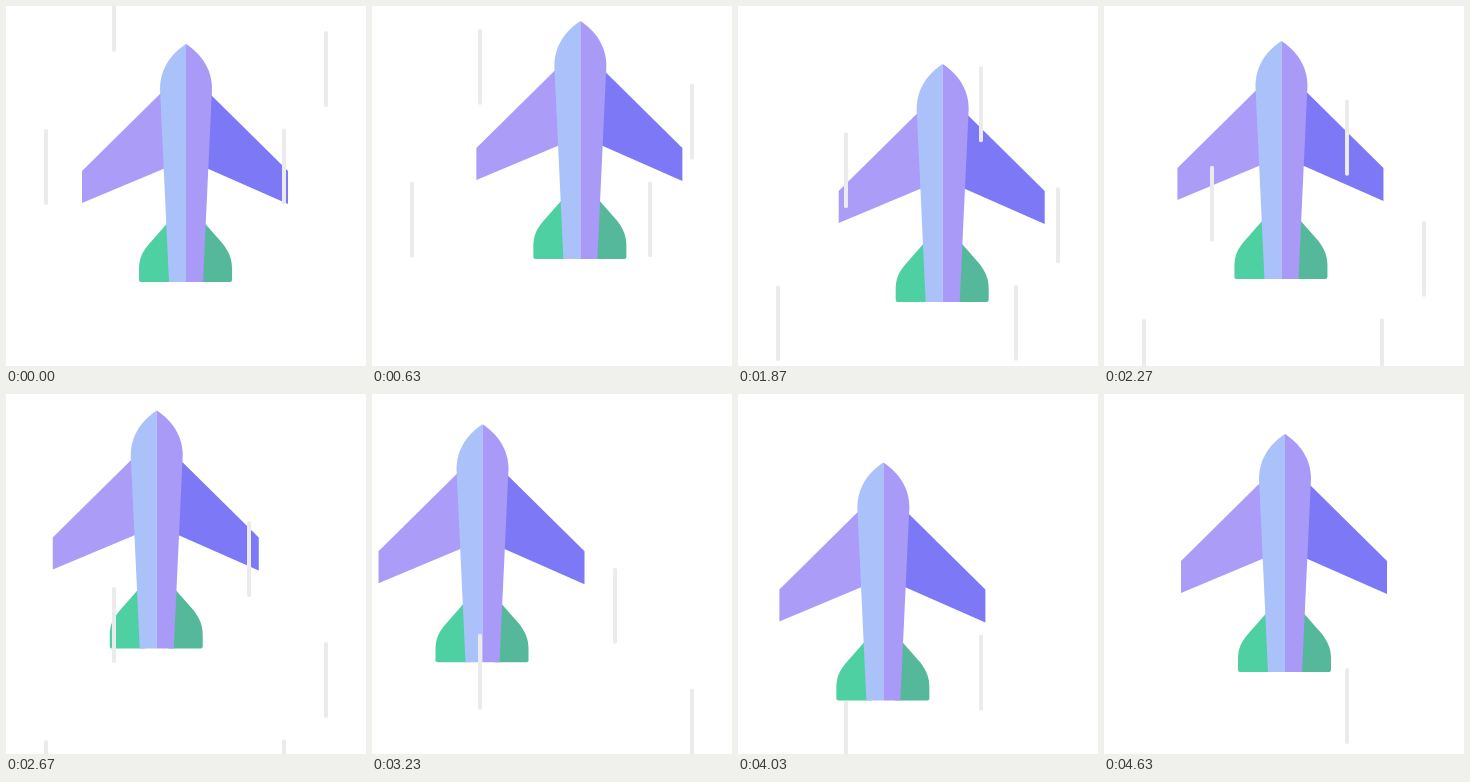
Recreate the animation shown at these times as an HTML page without scripts. Size 360x360 px, loop 5010 ms.

```html
<!DOCTYPE html>
<html lang="en">
<head>
<meta charset="utf-8">
<title>Plane in flight</title>
<style>
  html, body { margin: 0; width: 100%; height: 100%; overflow: hidden; background: #fff; }
  svg { display: block; width: 100%; height: 100%; }
</style>
</head>
<body>
<svg viewBox="0 0 360 360">
  <defs>
    <rect id="streak" x="-2" width="4" height="76" rx="2" fill="#ebebee"/>
  </defs>

  <!-- Figure-eight drift: one track per axis, origin at the nose tip -->
  <g>
    <animateTransform attributeName="transform" type="translate" dur="5.01s" repeatCount="indefinite"
      calcMode="spline" values="180 0; 241.5 0; 177.5 0; 108 0; 181 0; 181 0"
      keyTimes="0; .2395; .4531; .6747; .9242; 1"
      keySplines=".48 .07 .7 1; .3 0 .65 .7; .38 .25 .65 1; .37 0 .6 .9; 0 0 1 1"/>
    <g>
      <animateTransform attributeName="transform" type="translate" dur="5.01s" repeatCount="indefinite"
        calcMode="spline" values="0 38; 0 14; 0 60; 0 16; 0 68.5; 0 40; 0 40"
        keyTimes="0; .1437; .3433; .5469; .7984; .9242; 1"
        keySplines=".4 .1 .65 1; .4 0 .6 1; .4 0 .6 1; .45 0 .65 1; .45 0 .7 .9; 0 0 1 1"/>
      <g id="wings">
        <path fill="#ab9cf7" d="M-20 44 L-104 127 V159 L-18 123Z"/>
        <path fill="#7d78f5" d="M20 46 L102 127 V160 L18 123Z"/>
      </g>
      <g id="tail">
        <path fill="#4fd0a3" d="M-15 175 L-37 200 C-44 208 -47 215 -47 225 V236 Q-47 238 -45 238 H-12Z"/>
        <path fill="#55b89b" d="M15 175 L37 200 C43 208 46 215 46 225 V236 Q46 238 44 238 H12Z"/>
      </g>
      <g id="fuselage">
        <path fill="#abc1fa" d="M0 0 C-14 9 -26 24 -26 45 L-17 238 H0Z"/>
        <path fill="#a99af8" d="M0 0 C14 9 26 24 26 45 L17 238 H0Z"/>
      </g>
    </g>
  </g>

  <!-- Wind streaks falling at a steady speed -->
  <g>
    <animateTransform attributeName="transform" type="translate" dur="5.01s" repeatCount="indefinite"
      values="0 0; 0 370; 0 370" keyTimes="0; .8842; 1"/>
    <use href="#streak" x="40" y="123"/>
    <use href="#streak" x="278" y="122.5"/>
    <use href="#streak" x="320" y="25"/>
    <use href="#streak" x="108" y="-30">
      <animate attributeName="opacity" dur="5.01s" repeatCount="indefinite"
        calcMode="discrete" values="1; 0" keyTimes="0; .8483"/>
    </use>
    <use href="#streak" x="243" y="-96">
      <animate attributeName="opacity" dur="5.01s" repeatCount="indefinite"
        calcMode="discrete" values="0; 1" keyTimes="0; .1397"/>
    </use>
  </g>
</svg>
</body>
</html>
```
